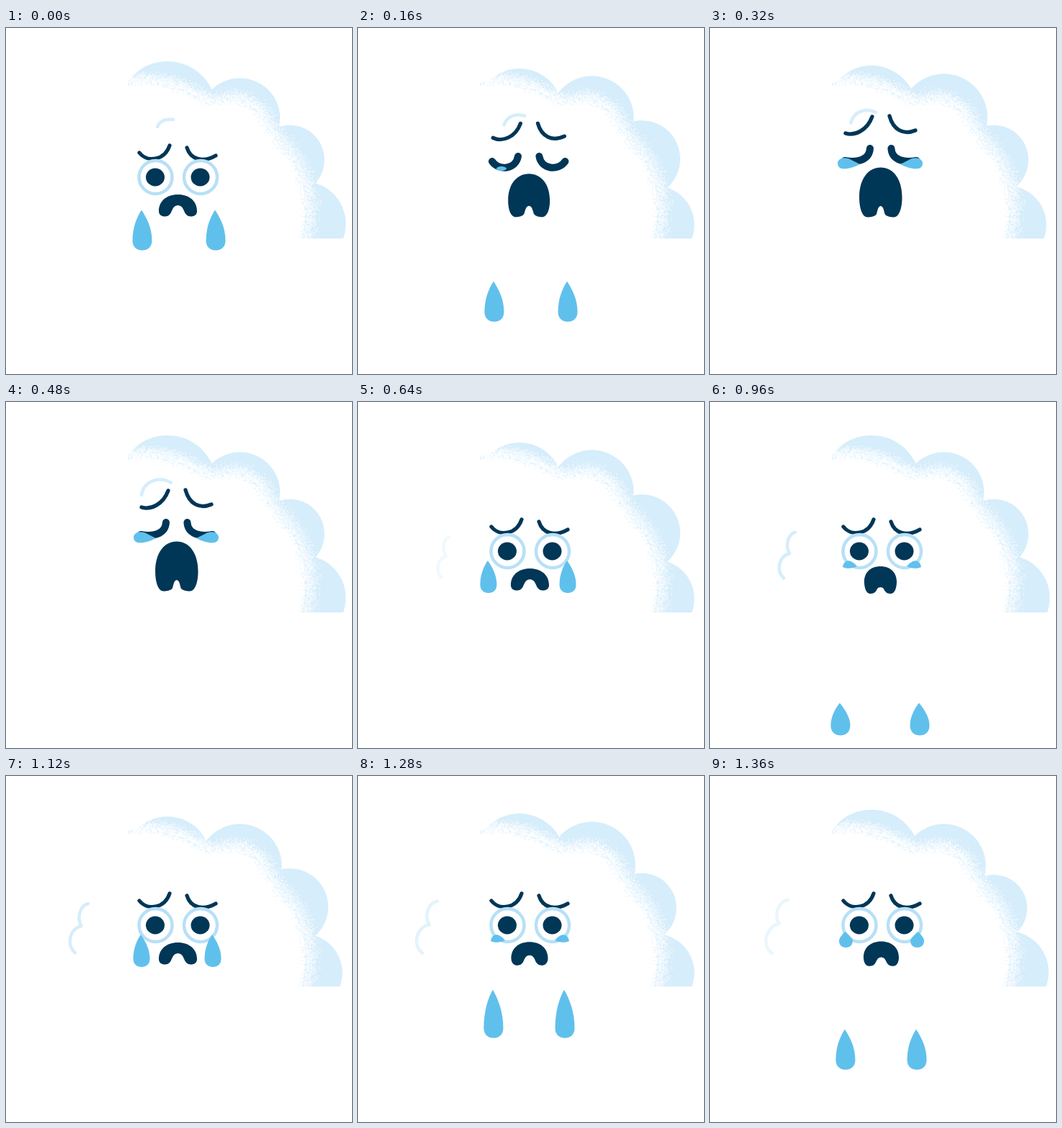
These frames come from a looping animation (480x480 px, 1440 ms). An HTML page with a canvas:

```html
<!DOCTYPE html>
<html lang="en">
<head>
<meta charset="utf-8">
<title>Crying cloud</title>
<style>
html, body { margin: 0; width: 100%; height: 100%; overflow: hidden; background: #fff; }
canvas { display: block; width: 480px; height: 480px; }
</style>
</head>
<body>
<canvas id="stage" width="480" height="480"></canvas>
<script>
const ctx = document.getElementById('stage').getContext('2d');
const STEP = 80, STEPS = 18;
const NAVY = '#003656', SKY = '#d6edfb', RING = '#b7e0f6', TEAR = '#60c0ec';

const clamp = u => Math.min(1, Math.max(0, u));
const mix = (a, b, u) => a.map((v, i) => v + (b[i] - v) * u);
const bump = (f, centre, width) => clamp(1 - Math.abs(f - centre) / width);

// Joined cubic curves: start point, then six numbers per curve
function trace(c, p) {
  c.moveTo(p[0], p[1]);
  for (let i = 2; i < p.length; i += 6) c.bezierCurveTo(...p.slice(i, i + 6));
}

function stroke(p, width, color) {
  ctx.beginPath();
  trace(ctx, p);
  ctx.lineWidth = width;
  ctx.strokeStyle = color;
  ctx.stroke();
}

function blob(p, color) {
  ctx.beginPath();
  trace(ctx, p);
  ctx.fillStyle = color;
  ctx.fill();
}

function ellipse(x, y, rx, ry, color) {
  ctx.beginPath();
  ctx.ellipse(x, y, rx, ry, 0, 0, Math.PI * 2);
  ctx.fillStyle = color;
  ctx.fill();
}

function mirrored(axis, draw) {
  draw();
  ctx.save();
  ctx.translate(axis * 2, 0);
  ctx.scale(-1, 1);
  draw();
  ctx.restore();
}

/* Cloud: each lobe breathes on a six-step cycle (x, y, r, swing, phase) */
const LOBES = [
  [224, 115, 63.5, 4.7, -0.4],
  [324.5, 124.5, 58, 2.7, 3.5],
  [393.5, 182.5, 50, 3.5, 2],
  [412.5, 272.5, 55.7, 3.2, 0]
];
const EDGE = [168, 75, 210, 70, 250, 82, 280, 105, 350, 85, 350, 125, 380, 163,
  412, 190, 424, 240, 411, 293];

// Chalky white body, drawn once
const body = document.createElement('canvas');
body.width = body.height = 480;
(function chalk() {
  const c = body.getContext('2d');
  let seed = 11;
  const rnd = () => (seed = (seed * 16807) % 2147483647) / 2147483647;
  const cubic = (a, b, p, q, u) =>
    a * (1 - u) ** 3 + 3 * b * u * (1 - u) ** 2 + 3 * p * u * u * (1 - u) + q * u ** 3;
  c.fillStyle = '#fff';
  c.beginPath();
  trace(c, EDGE);
  c.lineTo(100, 293);
  c.lineTo(100, 75);
  c.fill();

  // Specks thin out with distance from the edge, on either side of it
  function specks(count, reach, color) {
    c.fillStyle = color;
    for (let n = 0; n < count; n++) {
      const k = Math.floor(rnd() * 3), u = rnd();
      const at = (axis, v) => cubic(...[0, 2, 4, 6].map(i => EDGE[k * 6 + i + axis]), v);
      const x = at(0, u), y = at(1, u);
      const dx = at(0, u + 0.01) - x, dy = at(1, u + 0.01) - y;
      const d = reach * (1 + k * 0.15) * (1 - Math.cbrt(rnd())) / Math.hypot(dx, dy);
      c.fillRect(x + dy * d, y - dx * d, 1, 1);
    }
  }
  specks(6500, 20, 'rgba(255,255,255,.75)');
  specks(500, -9, SKY);
})();

function cloud(f) {
  for (const [x, y, r, swing, phase] of LOBES) {
    const grow = swing * Math.cos((f - phase) * Math.PI / 3);
    ellipse(x, y - grow / 4, r + grow, r + grow, SKY);
  }
  ctx.drawImage(body, 0, 0);
  ctx.fillStyle = '#fff';
  ctx.fillRect(0, 292, 480, 188);
}

/* Highlights */
const TOP_SHINE = [
  [210, 137, 214, 128, 223, 126, 232, 127],
  [188, 129, 191, 110, 212, 102, 229, 112]
];
const SIDE_SHINE = [
  [122, 184, 112, 188, 111, 203, 116, 212, 103, 216, 99, 234, 109, 244],
  [108, 172, 95, 174, 88, 193, 96, 205, 79, 208, 70, 233, 86, 246]
];

function shine(f) {
  const top = f < 8;
  ctx.globalAlpha = clamp(top ? (8 - f) / 2 : Math.min((f - 7) / 3, (20 - f) / 6));
  stroke(top ? mix(...TOP_SHINE, f / 6) : mix(...SIDE_SHINE, (f - 10) / 7), 4.5, SKY);
  ctx.globalAlpha = 1;
}

/* Face: each pair is a relaxed and a wailing pose */
const BROWS = [
  [[185, 173, 196, 187, 220, 184, 227, 163], [188, 146, 201, 150, 218, 142, 225, 123]],
  [[251, 166, 256, 183, 274, 187, 291, 177], [249, 122, 254, 141, 268, 149, 285, 142]]
];
const LID = [
  [186, 185, 196, 199, 219, 196, 222, 178],
  [187, 184, 203, 187, 221, 184, 222, 167]
];
const POOL = [177, 188, 177, 180, 189, 178, 196, 183, 200, 185, 204, 187, 208, 189,
  196, 195, 178, 200, 177, 188];
const SLIVER = [184, 229, 186, 218, 195, 217, 204, 228, 198, 231, 190, 232, 184, 229];

// centre, half width, top, widest y, bottom, notch top, notch half width
const FROWN = [238.5, 26.5, 231, 254, 261.5, 246, 10.5];
const WAIL = [236.8, 29.7, 193.5, 235, 262.5, 247, 6];
const GASP = [236.5, 22.5, 228, 249, 266, 257, 6];

// 0 relaxed, 1 full wail
const strain = f => Math.min(Math.sin(clamp(f / 3.6) * Math.PI / 2), clamp((8 - f) / 2));

function mouth(f) {
  const gasp = bump(f, 12, 2) + bump(f, 17, 2) / 2;
  const pose = mix(mix(FROWN, WAIL, strain(f)), GASP, gasp);
  const [cx, hw, top, mid, bot, notch, gap] = pose;
  const leg = cx - (gap + hw) / 2;
  mirrored(cx, () => blob([
    cx, notch,
    cx - gap * 0.7, notch, cx - gap * 0.8, bot - 6, cx - gap, bot - 4,
    cx - gap - 2, bot - 1, leg + 3, bot, leg, bot,
    leg - (hw - gap) * 0.35, bot, cx - hw, (bot + mid) / 2, cx - hw, mid,
    cx - hw, mid - (mid - top) * 0.6, cx - hw * 0.6, top, cx, top,
    cx + 1, top, cx + 1, notch, cx, notch
  ], NAVY));
}

function openEye(x) {
  ctx.beginPath();
  ctx.arc(x, 207, 23, 0, Math.PI * 2);
  ctx.lineWidth = 4.5;
  ctx.strokeStyle = RING;
  ctx.stroke();
  ellipse(x - 0.5, 207, 13, 12.5, NAVY);
}

function face(f) {
  const s = strain(f), shut = f > 1 && f < 8;
  ctx.save();
  ctx.translate(0, 4.5 * bump(f, 10, 2));
  BROWS.forEach(pair => stroke(mix(...pair, s), 5.2, NAVY));
  if (shut) mirrored(236.7, () => stroke(mix(...LID, clamp((s - 0.77) * 4.4)), 10, NAVY));
  else [207.5, 270].forEach(openEye);
  mouth(f);
  ctx.restore();
  if (f === 2) ellipse(199, 195, 7, 3, TEAR);
  if (shut && f > 3) mirrored(236, () => blob(POOL, TEAR));
}

/* Tears */
function drop(cx, top, h, hw) {
  const tip = cx - 1, bot = top + h;
  blob([
    tip, top,
    tip + hw * 0.5, top + h * 0.18, cx + hw, bot - h * 0.56, cx + hw, bot - hw,
    cx + hw, bot - hw * 0.3, cx + hw * 0.5, bot, cx, bot,
    cx - hw * 0.5, bot, cx - hw, bot - hw * 0.3, cx - hw, bot - hw,
    cx - hw, bot - h * 0.56, tip - hw * 0.5, top + h * 0.18, tip, top
  ], TEAR);
}

// Waves of two tears: first step, left x, right x
const WAVES = [[-1, 189, 291], [8, 181, 291], [14, 188, 287]];

function tears(f) {
  for (const [start, ...xs] of WAVES) {
    const age = f - start;
    if (age < 0 || age > 4) continue;
    const top = 220 + 27 * age + 5.6 * age * age;
    const h = 45 + 22 * bump(age, 2, 2);
    xs.forEach(x => drop(x, top, h, 11.5 + 2 * clamp(age)));
  }
  // New tears gather inside the eye rings
  if (f > 11 && f % 4 === 0) mirrored(238.5, () => blob(SLIVER, TEAR));
  if (f > 11 && f % 4 === 1) mirrored(238, () => drop(188.5, 216, 22, 9.5));
}

ctx.lineCap = ctx.lineJoin = 'round';

function frame() {
  const f = Math.floor(performance.now() / STEP) % STEPS;
  ctx.fillStyle = '#fff';
  ctx.fillRect(0, 0, 480, 480);
  [cloud, shine, face, tears].forEach(draw => draw(f));
  requestAnimationFrame(frame);
}
frame();
</script>
</body>
</html>
```
